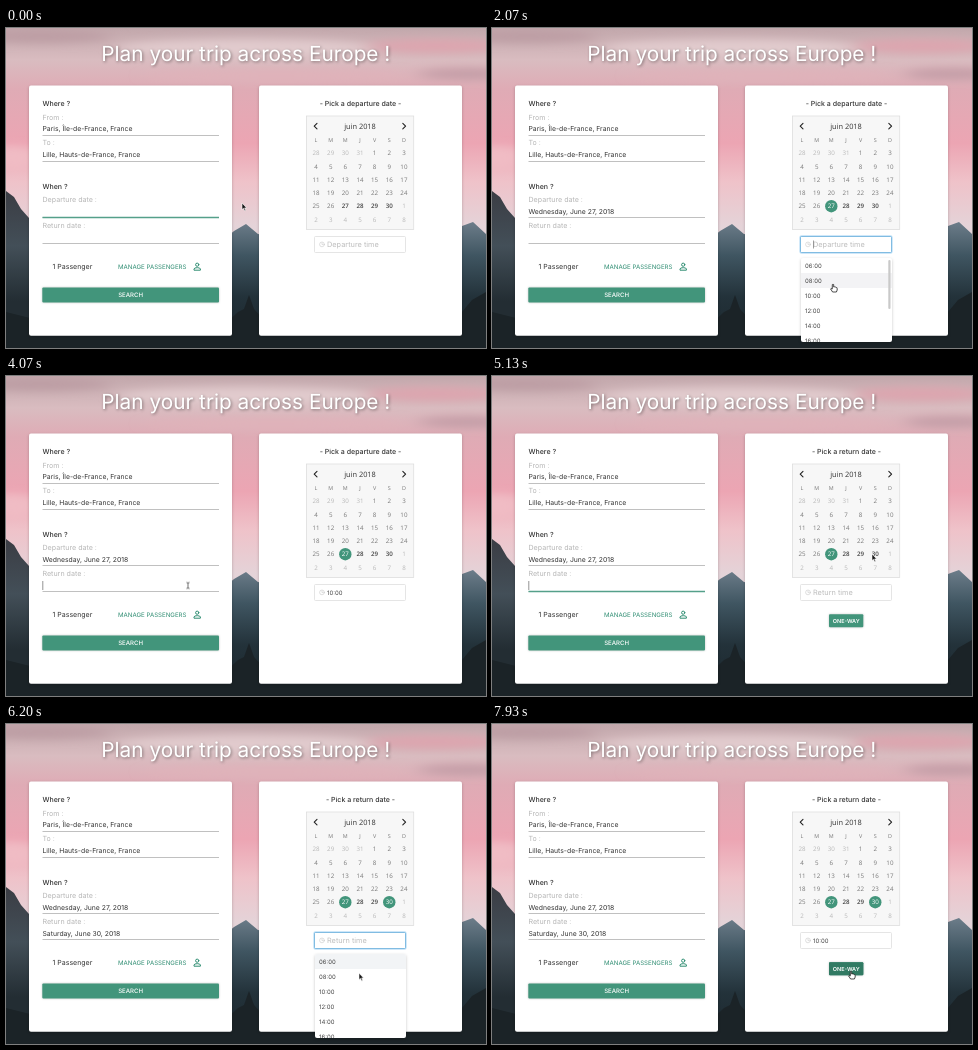
An HTML page that plays this animation: 480x320 px, repeating every 8 s.

```html
<!DOCTYPE html>
<html lang="en">
<head>
<meta charset="utf-8">
<title>Trip planner</title>
<style>
html, body { margin: 0; width: 100%; height: 100%; overflow: hidden; }
svg { display: block; width: 100vw; height: 100vh; text-rendering: geometricPrecision; }
text { font: 6.82px Inter, "Open Sans", sans-serif; fill: #333; }
.title { font-size: 20.8px; fill: #fff; filter: drop-shadow(1px 1.5px 1.5px rgba(0,0,0,.4)); }
.mid { text-anchor: middle; }
.head { font-size: 7px; font-weight: 500; }
.label { font-size: 7.1px; fill: #b6b6b6; }
.hint { font-size: 7.35px; fill: #bdbdbd; }
.time { font-size: 6px; fill: #444; }
.link { font-size: 6.15px; fill: #2f8d72; }
.button { font-size: 6.1px; font-weight: 500; fill: #fff; }
.small { font-size: 5.5px; font-weight: 600; }
.month { font: 500 7.4px "Open Sans", sans-serif; }
.day { font: 6.2px "Open Sans", sans-serif; fill: #777; }
.week { font-size: 5.4px; }
.other { fill: #b8b8b8; }
.open { font-weight: 600; fill: #444; }
.picked { fill: #fff; }
.card { fill: #fff; filter: drop-shadow(0 1px 1.5px rgba(0,0,0,.22)); }
.rise { filter: drop-shadow(0 .7px .8px rgba(0,0,0,.22)); }
.green { fill: #42957b; }
.line { stroke: #c0c0c0; }
.active { stroke: #55a08a; stroke-width: 1.4; }
.caret { stroke: #666; stroke-width: .7; }
.thin { fill: none; stroke-linecap: round; stroke-linejoin: round; }
#cursor { animation: travel 8s ease-in-out infinite; }
@keyframes travel {
  0%, .875% { transform: translate(236px, 175px); }
  10.875%, 19.25% { transform: translate(337px, 178px); }
  25.875%, 26.6% { transform: translate(341px, 256px); }
  32.5%, 35% { transform: translate(339px, 264px); }
  45%, 45.85% { transform: translate(182px, 206px); }
  45.9%, 52.5% { transform: translate(182px, 209.5px); }
  59.125%, 74.125% { transform: translate(380px, 178px); animation-timing-function: ease-in; }
  77.5% { transform: translate(353px, 249px); animation-timing-function: ease-out; }
  80.875%, 93.375% { transform: translate(351px, 265px); }
  99.125%, 100% { transform: translate(359px, 247px); }
}
</style>
</head>
<body>
<svg viewBox="0 0 480 320" preserveAspectRatio="none">
  <defs>
    <linearGradient id="sky" x2="0" y2="1">
      <stop offset="0" stop-color="#c2a8ac"/>
      <stop offset=".1" stop-color="#d9bcc0"/>
      <stop offset=".19" stop-color="#dfabb5"/>
      <stop offset=".36" stop-color="#eca5b3"/>
      <stop offset=".48" stop-color="#efc2c9"/>
      <stop offset=".62" stop-color="#e4d3d8"/>
    </linearGradient>
    <linearGradient id="ridge" x2="0" y2="1">
      <stop offset="0" stop-color="#6f7f8c"/>
      <stop offset=".28" stop-color="#3f5561"/>
      <stop offset=".6" stop-color="#23323a"/>
      <stop offset="1" stop-color="#1b262c"/>
    </linearGradient>
    <linearGradient id="slope" x2="0" y2="1">
      <stop offset="0" stop-color="#3b3d44"/>
      <stop offset=".35" stop-color="#434f58"/>
      <stop offset=".7" stop-color="#232d33"/>
    </linearGradient>
    <filter id="soft" x="-20%" y="-100%" width="140%" height="300%"><feGaussianBlur stdDeviation="9 4"/></filter>
    <clipPath id="menuBox"><rect x="309" y="230" width="91" height="84" rx="2"/></clipPath>
  </defs>

  <rect width="480" height="320" fill="url(#sky)"/>
  <g filter="url(#soft)">
    <ellipse cx="35" cy="8" rx="70" ry="7" fill="#bd9ea4"/>
    <ellipse cx="240" cy="20" rx="130" ry="9" fill="#e1cbcd"/>
    <ellipse cx="430" cy="18" rx="70" ry="7" fill="#dda5af"/>
    <ellipse cx="270" cy="48" rx="130" ry="5" fill="#e0b2ba"/>
    <ellipse cx="462" cy="46" rx="50" ry="6" fill="#c59ea7"/>
    <ellipse cx="5" cy="130" rx="30" ry="12" fill="#f0bcc4"/>
  </g>
  <path d="M0 200L14 192 30 204 215 214 228 203 240 196 252 206 300 214 440 204 456 198 467 194 480 206V320H0Z" fill="url(#ridge)"/>
  <path d="M0 163L8 169 15 181 23 190 30 215V320H0Z" fill="url(#slope)"/>
  <path d="M0 284L24 290V300H215L232 284 238 281 243 267 248 281 258 292H440L456 284 466 272 480 264V320H0Z" fill="#1b2327"/>

  <text class="title mid" x="239.8" y="33">Plan your trip across Europe !</text>

  <rect class="card" x="23" y="57.5" width="203" height="250.3" rx="2"/>
  <text class="head" x="36.5" y="78">Where ?</text>
  <text class="label" x="36.5" y="91.5">From :</text>
  <text x="36.5" y="103.3">Paris, Île-de-France, France</text>
  <text class="label" x="36.5" y="117">To :</text>
  <text x="36.5" y="129">Lille, Hauts-de-France, France</text>
  <text class="head" x="36.5" y="160.5">When ?</text>
  <text class="label" x="36.5" y="174">Departure date :</text>
  <text x="36.5" y="186" data-on="1270 8000">Wednesday, June 27, 2018</text>
  <text class="label" x="36.5" y="199.5">Return date :</text>
  <text x="36.5" y="211.5" data-on="5400 8000">Saturday, June 30, 2018</text>
  <path class="line" d="M36.5 107.5H213M36.5 133.5H213M36.5 189.5H213M36.5 215.5H213"/>
  <path class="active" d="M36.5 189.5H213" data-on="0 930" data-fade="150"/>
  <path class="active" d="M36.5 215.5H213" data-on="4130 5400" data-fade="200"/>
  <path class="caret" d="M36.8 205V214" data-on="3930 4430 4930 5400"/>
  <text class="head" style="font-weight: 400" x="46.5" y="241">1 Passenger</text>
  <text class="link" x="112" y="240.9">MANAGE PASSENGERS</text>
  <g class="thin" stroke="#2f8d72">
    <circle cx="191.2" cy="236.7" r="1.6"/>
    <path d="M188 241.8V241Q188 239.7 191.2 239.7T194.4 241V241.8Z"/>
  </g>
  <rect class="green rise" x="36.3" y="259.6" width="176.7" height="15" rx="1"/>
  <text class="button mid" x="124.6" y="269.3">SEARCH</text>

  <rect class="card" x="253" y="57.5" width="203" height="250.3" rx="2"/>
  <text class="head mid" x="354.5" y="78" data-on="0 4270">- Pick a departure date -</text>
  <text class="head mid" x="354.5" y="78" data-on="4270 8000">- Pick a return date -</text>

  <g id="calendar">
    <rect x="300.5" y="88" width="107.2" height="113.5" fill="#f7f7f7" stroke="#dedede" stroke-width=".8"/>
    <text class="month mid" x="354" y="100.7">juin 2018</text>
    <path class="thin" d="M311 95.3L308.2 98.1 311 100.9M396.8 95.3L399.6 98.1 396.8 100.9" stroke="#222" stroke-width="1.1"/>
  </g>

  <rect x="308.5" y="208.5" width="91" height="16" rx="1" fill="#fff" stroke="#dfdfdf" stroke-width=".8"/>
  <g fill="none" data-on="1270 2800 5470 6870" data-fade="200">
    <rect x="308" y="208" width="92" height="17" rx="1.5" stroke="#bfe0f7" stroke-width="1.4"/>
    <rect x="308.5" y="208.5" width="91" height="16" rx="1" stroke="#6fb3de" stroke-width=".8"/>
  </g>
  <g class="thin" stroke="#cbcbcb" stroke-width=".6">
    <circle cx="316" cy="216.4" r="2.4"/>
    <path d="M316 215V216.6H317.2"/>
  </g>
  <text class="hint" x="321" y="219" data-on="0 2800">Departure time</text>
  <text class="hint" x="321" y="219" data-on="4270 6870">Return time</text>
  <text class="time" x="321" y="218.6" data-on="2800 4270 6870 8000">10:00</text>
  <path class="caret" d="M321.4 212.5V220.5" data-on="930 1430 1930 2430 5400 5900 6400 6870"/>

  <g data-on="4270 8000">
    <rect class="green rise" x="337" y="238.3" width="34.3" height="13" rx="1"/>
    <rect x="337" y="238.3" width="34.3" height="13" rx="1" fill="#317a63" data-on="7750 8000" data-fade="100"/>
    <text class="button small mid" x="354.2" y="246.8">ONE-WAY</text>
  </g>

  <g data-on="1400 2800 5500 6870" data-fade="200">
    <rect class="card" x="309" y="230" width="91" height="84" rx="2"/>
    <g id="menu" clip-path="url(#menuBox)">
      <rect x="309" y="230" width="91" height="15" fill="#f2f4f6" data-on="0 2000 3100 6270"/>
      <rect x="309" y="245" width="91" height="15" fill="#f3f3f5" data-on="2000 2330 6270 6330"/>
      <rect x="309" y="260" width="91" height="15" fill="#f3f3f5" data-on="2330 3100 6330 8000"/>
    </g>
    <rect x="396.3" y="232" width="2.2" height="49" rx="1.1" fill="#c9c9c9" data-on="0 2700 5500 5950" data-fade="150"/>
  </g>

  <g id="cursor">
    <path d="M0 0V6.6L1.5 5.3 2.6 7.8 3.7 7.3 2.6 4.9H4.6Z" fill="#111" stroke="#fff" stroke-width=".6"
      data-on="0 2000 2900 3450 4270 6250 6970 7750"/>
    <path d="M-.7 .6Q0-.4 .7 .6V3Q1.5 2.5 2 3.2 2.8 2.8 3.2 3.5 4.2 3.3 4.2 4.5V6L3.4 8H-.4L-2.4 4.9Q-2.2 3.9-.7 4.9Z"
      fill="#fff" stroke="#111" stroke-width=".75" data-on="2000 2900 6250 6970 7750 8000"/>
    <path class="thin" d="M-1.2-3Q0-3 0-2.2 0-3 1.2-3M0-2.2V2.2M-1.2 3Q0 3 0 2.2 0 3 1.2 3"
      stroke="#333" stroke-width=".7" data-on="3450 4270"/>
  </g>
</svg>
<script>
const LOOP = 8000;
const calendar = document.getElementById('calendar');
const menu = document.getElementById('menu');

function add(parent, tag, attrs, content = '') {
  const el = document.createElementNS('http://www.w3.org/2000/svg', tag);
  for (const key in attrs) el.setAttribute(key, attrs[key]);
  el.textContent = content;
  return parent.appendChild(el);
}

const columnX = column => 310 + column * 14.65;

[...'LMMJVSD'].forEach((letter, i) =>
  add(calendar, 'text', { class: 'day week mid', x: columnX(i), y: 114 }, letter));

// The grid starts on 28 May and runs for six weeks.
for (let i = 0; i < 42; i++) {
  const date = new Date(2018, 4, 28 + i);
  const day = date.getDate();
  const inMonth = date.getMonth() === 5;
  const x = columnX(i % 7);
  const y = 125 + Math.floor(i / 7) * 13.3;
  const kind = !inMonth ? 'other' : day >= 27 ? 'open' : '';
  add(calendar, 'text', { class: `day mid ${kind}`, x, y: y + 2.2 }, day);
  const pickedAt = inMonth && { 27: 1270, 30: 5400 }[day];
  if (pickedAt) {
    const group = add(calendar, 'g', { 'data-on': `${pickedAt} ${LOOP}` });
    add(group, 'circle', { class: 'green', cx: x, cy: y, r: 6.2 });
    add(group, 'text', { class: 'day mid picked', x, y: y + 2.2 }, day);
  }
}

for (let i = 0; i < 6; i++) {
  const hour = String(6 + 2 * i).padStart(2, '0');
  add(menu, 'text', { class: 'time', x: 313, y: 239.8 + 15 * i }, `${hour}:00`);
}

// data-on lists start/end pairs in ms; data-fade is the length of each change.
for (const el of document.querySelectorAll('[data-on]')) {
  const times = el.dataset.on.split(' ').map(Number);
  const fade = Number(el.dataset.fade || 1);
  const frames = [{ offset: 0, opacity: times[0] === 0 ? 1 : 0 }];
  times.forEach((time, i) => {
    if (time === 0 || time === LOOP) return;
    frames.push({ offset: time / LOOP, opacity: i % 2 });
    frames.push({ offset: (time + fade) / LOOP, opacity: 1 - i % 2 });
  });
  frames.push({ offset: 1, opacity: frames[frames.length - 1].opacity });
  el.animate(frames, { duration: LOOP, iterations: Infinity });
}
</script>
</body>
</html>
```
